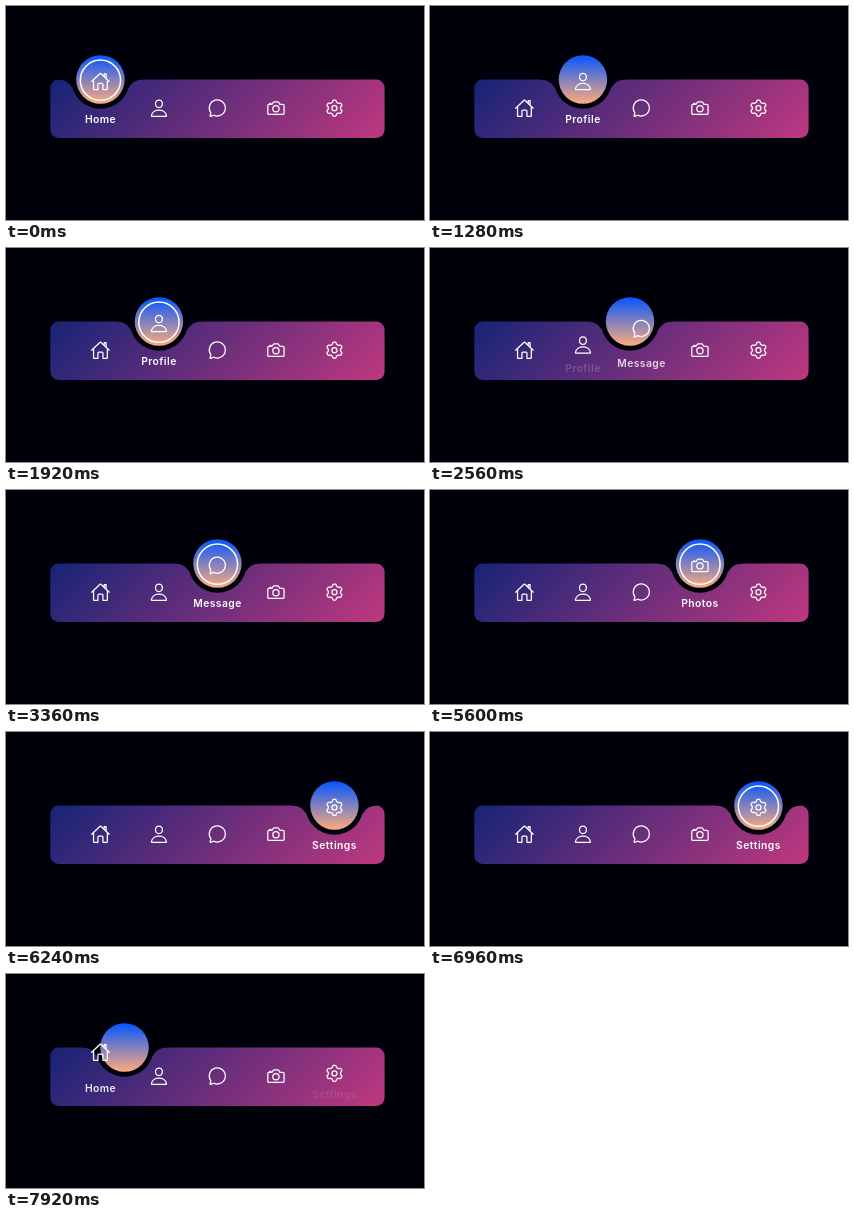
Animation of 418 by 214 pixels, one loop 8000 ms. Source, as an HTML page with a canvas:

```html
<!DOCTYPE html>
<html lang="en">
<head>
<meta charset="utf-8">
<title>Navigation bar</title>
<style>
  html, body { margin: 0; width: 100%; height: 100%; overflow: hidden; background: #00000b; }
  canvas { display: block; width: 418px; height: 214px; }
</style>
</head>
<body>
<canvas id="stage"></canvas>
<script>
const W = 418, H = 214, LOOP = 8000, BG = '#00000b';
const U = 0.8357;                       // stage pixels per layout unit
const BAR = { x: 44.3, y: 73.5, w: 400 * U, h: 70 * U };
const STEP = 70 * U, FIRST = BAR.x + 25 * U + STEP / 2;
const MOVE = 500, RING_DELAY = 500;

const canvas = document.getElementById('stage');
const dpr = window.devicePixelRatio || 1;
canvas.width = W * dpr;
canvas.height = H * dpr;
const ctx = canvas.getContext('2d');

// Icons live in a 512 unit box
function gear() {
  const p = new Path2D();
  const corners = [];
  for (let i = 0; i < 6; i++) {
    for (const [deg, r] of [[-21, 158], [-10, 207], [10, 207], [21, 158]]) {
      const a = (i * 60 + deg - 90) * Math.PI / 180;
      corners.push([256 + r * Math.cos(a), 256 + r * Math.sin(a)]);
    }
  }
  const n = corners.length;
  const last = corners[n - 1], first = corners[0];
  p.moveTo((last[0] + first[0]) / 2, (last[1] + first[1]) / 2);
  for (let i = 0; i < n; i++) {
    p.arcTo(...corners[i], ...corners[(i + 1) % n], 22);
  }
  p.closePath();
  p.moveTo(320, 256);
  p.arc(256, 256, 64, 0, Math.PI * 2);
  return p;
}

const home = new Path2D(
  'M80 212v236a16 16 0 0 0 16 16h96V328a24 24 0 0 1 24-24h80a24 24 0 0 1 24 24v136h96a16 16 0 0 0 16-16V212' +
  'M480 256L267 52c-5-5-17-5-22 0L32 256M400 179V64h-48v69');
const person = new Path2D(
  'M344 144c-4 53-44 96-88 96s-84-43-88-96c-4-55 35-96 88-96s92 42 88 96z' +
  'M256 304c-87 0-175 48-192 139c-2 11 5 21 16 21h352c11 0 18-10 16-21C431 352 343 304 256 304z');
const bubble = new Path2D(
  'M83 365A205 205 0 1 1 172 438Q160 433 149 438L82 463Q66 466 68 451L87 380Q89 374 83 365Z');
const camera = new Path2D(
  'M350 149l-26-42C318 100 311 96 302 96h-92c-9 0-16 4-22 11l-27 42C156 155 149 160 140 160H80a32 32 0 0 0-32 32v192' +
  'a32 32 0 0 0 32 32h352a32 32 0 0 0 32-32V192a32 32 0 0 0-32-32h-59c-9 0-17-5-23-11z' +
  'M336 272a80 80 0 1 1-160 0a80 80 0 1 1 160 0zM124 158v-22h-24v22');

const items = [
  ['Home', home], ['Profile', person], ['Message', bubble], ['Photos', camera], ['Settings', gear()]
].map(([label, icon], i) => ({ label, icon, x: FIRST + i * STEP }));

// Moments at which an item becomes active
const picks = [
  { at: -3000, item: 0 }, { at: 755, item: 1 }, { at: 2310, item: 2 },
  { at: 4040, item: 3 }, { at: 5705, item: 4 }, { at: 7612, item: 0 }
];

// The standard CSS "ease" curve: cubic-bezier(.25, .1, .25, 1)
function ease(x) {
  if (x <= 0) return 0;
  if (x >= 1) return 1;
  const bez = (a, b, s) => 3 * a * s * (1 - s) ** 2 + 3 * b * s * s * (1 - s) + s ** 3;
  let lo = 0, hi = 1;
  for (let i = 0; i < 24; i++) {
    const mid = (lo + hi) / 2;
    if (bez(0.25, 0.25, mid) < x) lo = mid; else hi = mid;
  }
  return bez(0.1, 1, lo);
}

function gradient(x0, y0, x1, y1, from, to) {
  const g = ctx.createLinearGradient(x0, y0, x1, y1);
  g.addColorStop(0, from);
  g.addColorStop(1, to);
  return g;
}

function disc(x, y, r, fill) {
  ctx.beginPath();
  ctx.arc(x, y, r, 0, Math.PI * 2);
  ctx.fillStyle = fill;
  ctx.fill();
}

function drawBar() {
  const cx = BAR.x + BAR.w / 2, cy = BAR.y + BAR.h / 2, d = (BAR.w + BAR.h) / 4;
  ctx.fillStyle = gradient(cx - d, cy - d, cx + d, cy + d, '#162477', '#bf387f');
  ctx.beginPath();
  ctx.roundRect(BAR.x, BAR.y, BAR.w, BAR.h, 10 * U);
  ctx.fill();
}

// Rounded shoulder beside the notch; side is -1 or 1
function drawShoulder(x, side) {
  ctx.save();
  ctx.translate(x, BAR.y);
  ctx.scale(-side * U, U);
  ctx.beginPath();
  ctx.moveTo(-51, -2);
  ctx.arc(-51, 20, 20, -Math.PI / 2, -Math.PI / 6);
  ctx.lineTo(-30, 10);
  ctx.lineTo(-30, -2);
  ctx.closePath();
  ctx.fillStyle = BG;
  ctx.fill();
  ctx.restore();
}

function drawIndicator(x) {
  const y = BAR.y, r = 29 * U;
  drawShoulder(x, -1);
  drawShoulder(x, 1);
  disc(x, y, 35 * U, BG);
  disc(x, y, r, gradient(0, y - r, 0, y + r, '#0455ff', '#ffab7c'));
}

function drawRing(x, scale) {
  if (scale <= 0) return;
  ctx.beginPath();
  ctx.arc(x, 74.2, 24.1 * U * scale, 0, Math.PI * 2);
  ctx.lineWidth = 1.8 * U * scale;
  ctx.strokeStyle = '#fff';
  ctx.stroke();
}

function drawItem({ label, icon, x }, lift) {
  const s = 24 * U / 512;
  ctx.save();
  ctx.translate(x, 102.2 - 32 * U * lift);
  ctx.scale(s, s);
  ctx.translate(-256, -256);
  ctx.lineWidth = 32;
  ctx.lineJoin = ctx.lineCap = 'round';
  ctx.strokeStyle = '#fff';
  ctx.stroke(icon);
  ctx.restore();

  if (lift <= 0) return;
  ctx.globalAlpha = lift;
  ctx.fillStyle = '#fff';
  ctx.font = '600 10.3px Inter, "Open Sans", sans-serif';
  ctx.letterSpacing = '0.45px';
  ctx.textAlign = 'center';
  ctx.fillText(label, x, 117 + 10 * U * (1 - lift));
  ctx.globalAlpha = 1;
}

function draw(t) {
  let n = picks.length - 1;
  while (n > 0 && picks[n].at > t) n--;
  const now = picks[n].item;
  const old = n > 0 ? picks[n - 1].item : now;
  const age = t - picks[n].at;
  const p = ease(age / MOVE);

  ctx.setTransform(dpr, 0, 0, dpr, 0, 0);
  ctx.fillStyle = BG;
  ctx.fillRect(0, 0, W, H);
  drawBar();
  drawIndicator(items[old].x + (items[now].x - items[old].x) * p);
  items.forEach((item, i) => drawItem(item, i === now ? p : i === old ? 1 - p : 0));
  drawRing(items[now].x, ease((age - RING_DELAY) / MOVE));
}

const start = performance.now();
function tick() {
  draw((performance.now() - start) % LOOP);
  requestAnimationFrame(tick);
}
tick();
</script>
</body>
</html>
```
